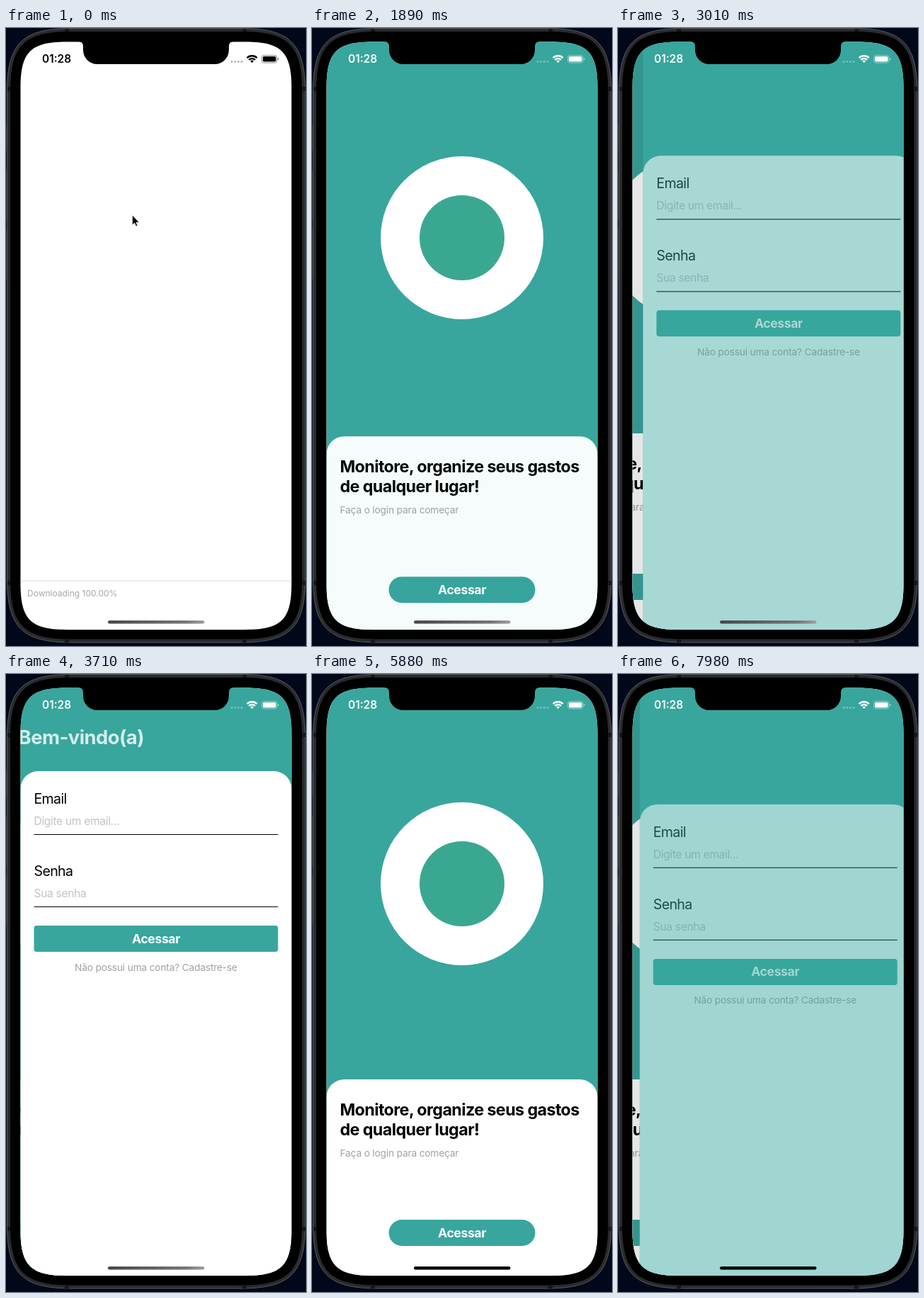
An HTML page for the animation above (8 s loop, 424 by 872 pixels).

```html
<!DOCTYPE html>
<html lang="pt">
<head>
<meta charset="utf-8">
<style>
  html, body { margin: 0; width: 100%; height: 100%; overflow: hidden; background: #02071a; }
  svg { display: block; width: 424px; height: 872px; font-family: Inter, "Open Sans", sans-serif; }
  .bold { font-weight: 700; }
  .title { font-size: 23.3px; letter-spacing: -.6px; }
  .header { font-size: 27.5px; letter-spacing: -.6px; fill: #fff; }
  .label { font-size: 19.6px; letter-spacing: -.66px; }
  .hint { font-size: 15.7px; letter-spacing: -.38px; fill: #c3c3c6; }
  .note { font-size: 13.75px; letter-spacing: -.19px; fill: #a1a1a1; }
  .action { font-size: 17.7px; letter-spacing: -.45px; fill: #fff; }
  .mid { text-anchor: middle; }
  .teal { fill: #38a69d; }
</style>
</head>
<body>
<svg viewBox="0 0 424 872">
  <defs>
    <clipPath id="screen"><path id="glass"/></clipPath>
    <linearGradient id="grey">
      <stop stop-color="#484848"/><stop offset=".8" stop-color="#757575"/><stop offset="1" stop-color="#a0a0a0"/>
    </linearGradient>
  </defs>

  <!-- phone body -->
  <path d="M.5 138v35M.5 201v70M.5 284v70" stroke="#1c1e22"/>
  <path id="body" fill="#292b2d" stroke="#595b5d"/>
  <path id="bezel"/>
  <path d="M2 86h4M2 783h4M419 86h4M419 783h4M86 1v4M337 1v4M86 863v4M337 863v4" stroke="#161718" stroke-width="6"/>

  <g clip-path="url(#screen)">
    <rect width="424" height="872" fill="#fff"/>
    <g id="loading">
      <path d="M20 780h384" stroke="#dcdcdc"/>
      <text x="30" y="802" font-size="12" fill="#a5a5a5">Downloading 100.00%</text>
    </g>

    <g id="home">
      <rect class="teal" x="20.5" width="383" height="872"/>
      <g id="badge">
        <circle r="115" fill="#fff"/>
        <circle r="60" fill="#3aa890"/>
      </g>
      <g id="intro">
        <rect x="20.5" y="572" width="383" height="400" rx="25" fill="#fff"/>
        <text class="bold title" x="39.5" y="622.5">Monitore, organize seus gastos</text>
        <text class="bold title" x="39.5" y="650.5">de qualquer lugar!</text>
        <text class="note" x="39.5" y="681">Faça o login para começar</text>
        <g id="button">
          <rect class="teal" x="108.5" y="770" width="207" height="37" rx="18.5"/>
          <text class="bold action mid" x="212" y="795">Acessar</text>
        </g>
      </g>
      <rect id="dim" x="20.5" width="383" height="872"/>
    </g>

    <g id="login">
      <rect class="teal" x="20.5" width="383" height="872"/>
      <text id="welcome" class="bold header" x="38.5" y="99">Bem-vindo(a)</text>
      <g id="form">
        <rect x="20.5" y="137" width="383" height="900" rx="25" fill="#fff"/>
        <text class="label" x="39.5" y="183">Email</text>
        <text class="hint" x="39.5" y="213">Digite um email...</text>
        <text class="label" x="39.5" y="285">Senha</text>
        <text class="hint" x="39.5" y="315">Sua senha</text>
        <path d="M39.5 226.5h345M39.5 328.5h345" stroke="#000" stroke-width="1.1"/>
        <rect class="teal" x="39.5" y="355" width="345" height="37" rx="4"/>
        <text class="bold action mid" x="212" y="379.5">Acessar</text>
        <text class="note mid" x="212" y="418.5">Não possui uma conta? Cadastre-se</text>
      </g>
    </g>
    <rect id="bar" x="144" y="836" width="136.5" height="4.6" rx="2.3"/>
  </g>

  <path d="M102 19q7 0 7 7v5a20 20 0 0 0 20 20h166a20 20 0 0 0 20-20v-5q0-7 7-7z"/>

  <g id="status">
    <text x="51" y="49" font-size="15.4" font-weight="600">01:28</text>
    <g opacity=".3">
      <circle cx="319" cy="47.5" r="1.5"/><circle cx="323.7" cy="47.5" r="1.5"/>
      <circle cx="328.4" cy="47.5" r="1.5"/><circle cx="333.1" cy="47.5" r="1.5"/>
    </g>
    <g fill="none" stroke="currentColor" stroke-width="2.3">
      <path d="M340.6 42.2a10 10 0 0 1 14.2 0M343.2 45a6.3 6.3 0 0 1 9 0"/>
      <rect x="361.5" y="38.5" width="21.5" height="10.6" rx="3.2" stroke-width="1" opacity=".45"/>
    </g>
    <path d="M347.7 49.2l-2.4-2.5a3.4 3.4 0 0 1 4.8 0z"/>
    <rect x="363" y="40" width="18.5" height="7.6" rx="1.8"/>
    <path d="M384 42q1.6.6 1.6 1.8t-1.6 1.8z" opacity=".5"/>
  </g>

  <path id="cursor" d="M178.5 264v14l3.2-2.9 2 4.7 2.2-.9-2-4.6h4.3z" stroke="#fff" stroke-width=".7"/>
</svg>

<script>
const LOOP = 8000, STEP = 70, WIDTH = 383;
const el = {};
document.querySelectorAll('svg [id]').forEach(e => el[e.id] = e);

const clamp = v => Math.min(1, Math.max(0, v));
const show = (e, on) => e.setAttribute('display', on ? 'inline' : 'none');
const move = (e, x, y) => e.setAttribute('transform', `translate(${x} ${y})`);
const fade = (e, v) => e.setAttribute('opacity', v);

// rectangle whose corners bend gradually, as on the phone
function squircle(x, y, w, h, r) {
  const a = 1.4 * r, b = 1.085 * r, c = .315 * r;
  return `M${x} ${y + a}c0 ${-b} ${c} ${-a} ${a} ${-a}`.replace(/c.*/, `c0 ${-b} ${c} ${-a} ${a} ${-a}`)
    .replace(/c.*/, `C${x} ${y + c} ${x + c} ${y} ${x + a} ${y}`)
    + `H${x + w - a}C${x + w - c} ${y} ${x + w} ${y + c} ${x + w} ${y + a}`
    + `V${y + h - a}C${x + w} ${y + h - c} ${x + w - c} ${y + h} ${x + w - a} ${y + h}`
    + `H${x + a}C${x + c} ${y + h} ${x} ${y + h - c} ${x} ${y + h - a}z`;
}
el.body.setAttribute('d', squircle(1.5, .5, 421.5, 866.5, 66));
el.bezel.setAttribute('d', squircle(6, 5, 412.5, 857.5, 61));
el.glass.setAttribute('d', squircle(20.5, 19.5, WIDTH, 829.5, 46));

// cubic-bezier(x1, y1, x2, y2), solved by bisection
function bezier(x1, y1, x2, y2) {
  const at = (a, b, s) => 3 * a * s * (1 - s) ** 2 + 3 * b * s * s * (1 - s) + s ** 3;
  return t => {
    let lo = 0, hi = 1;
    for (let i = 0; i < 24; i++) {
      const s = (lo + hi) / 2;
      if (at(x1, x2, s) < t) lo = s; else hi = s;
    }
    return at(y1, y2, lo);
  };
}
const ease = bezier(.25, .1, .25, 1);
const easeIn = bezier(.42, 0, 1, 1);
const enter = (t, start) => ease(clamp((t - start) / 1000));

// part of the way the login page still has to travel: 1 = off to the right
function remaining(t) {
  if (t >= 4620 && t < 7700) {
    const u = clamp((t - 4550) / 1330) ** .775;
    return u * u * (3 - 2 * u);
  }
  if (t < 2730) return 1;
  const w = .0165 * (t - (t < 4620 ? 2704 : 7647));
  return w > 12 ? 0 : (1 + w) * Math.exp(-w);
}

function flipAngle(p) {
  const angles = [90, 35, -20, 10, -5, 0];
  const i = Math.min(4, Math.floor(p * 5));
  return angles[i] + (angles[i + 1] - angles[i]) * (p * 5 - i);
}

// the button dims over two steps while held, then recovers
function pressOpacity(t, down, up) {
  if (t < down) return 1;
  return t < up ? .2 : .2 + .8 * clamp((t - up) / 250);
}

function draw(t) {
  show(el.cursor, t < 70);
  show(el.loading, t < 350);
  el.status.setAttribute('fill', t < 490 ? '#000' : '#fff');
  el.status.style.color = t < 490 ? '#000' : '#fff';
  el.bar.setAttribute('fill', t < 4620 ? 'url(#grey)' : '#000');

  const left = remaining(t);
  show(el.home, t >= 630);
  move(el.home, -.3 * WIDTH * (1 - left), 0);
  fade(el.dim, .1 * (1 - left));

  const flip = easeIn(clamp((t - 547) / 1000));
  const scale = Math.cos(flipAngle(flip) * Math.PI / 180);
  el.badge.setAttribute('transform', `translate(212 296) scale(${scale} 1)`);
  fade(el.badge, clamp(flip / .6));

  const intro = enter(t, 1147);
  move(el.intro, 0, 100 * (1 - intro));
  fade(el.intro, intro);
  fade(el.button, t < 4620 ? pressOpacity(t, 2450, 2730) : pressOpacity(t, 7490, 7700));

  show(el.login, left < 1);
  move(el.login, WIDTH * left, 0);
  const second = t >= 7000;
  const form = enter(t, second ? 7671 : 2682);
  move(el.form, 0, 100 * (1 - form));
  fade(el.form, form);
  const welcome = enter(t, second ? 8210 : 3221);
  move(el.welcome, -100 * (1 - welcome), 0);
  fade(el.welcome, welcome);
}

const began = performance.now();
function tick() {
  const t = Math.max(0, performance.now() - began) % LOOP;
  draw(Math.floor(t / STEP) * STEP);
  requestAnimationFrame(tick);
}
tick();
</script>
</body>
</html>
```
